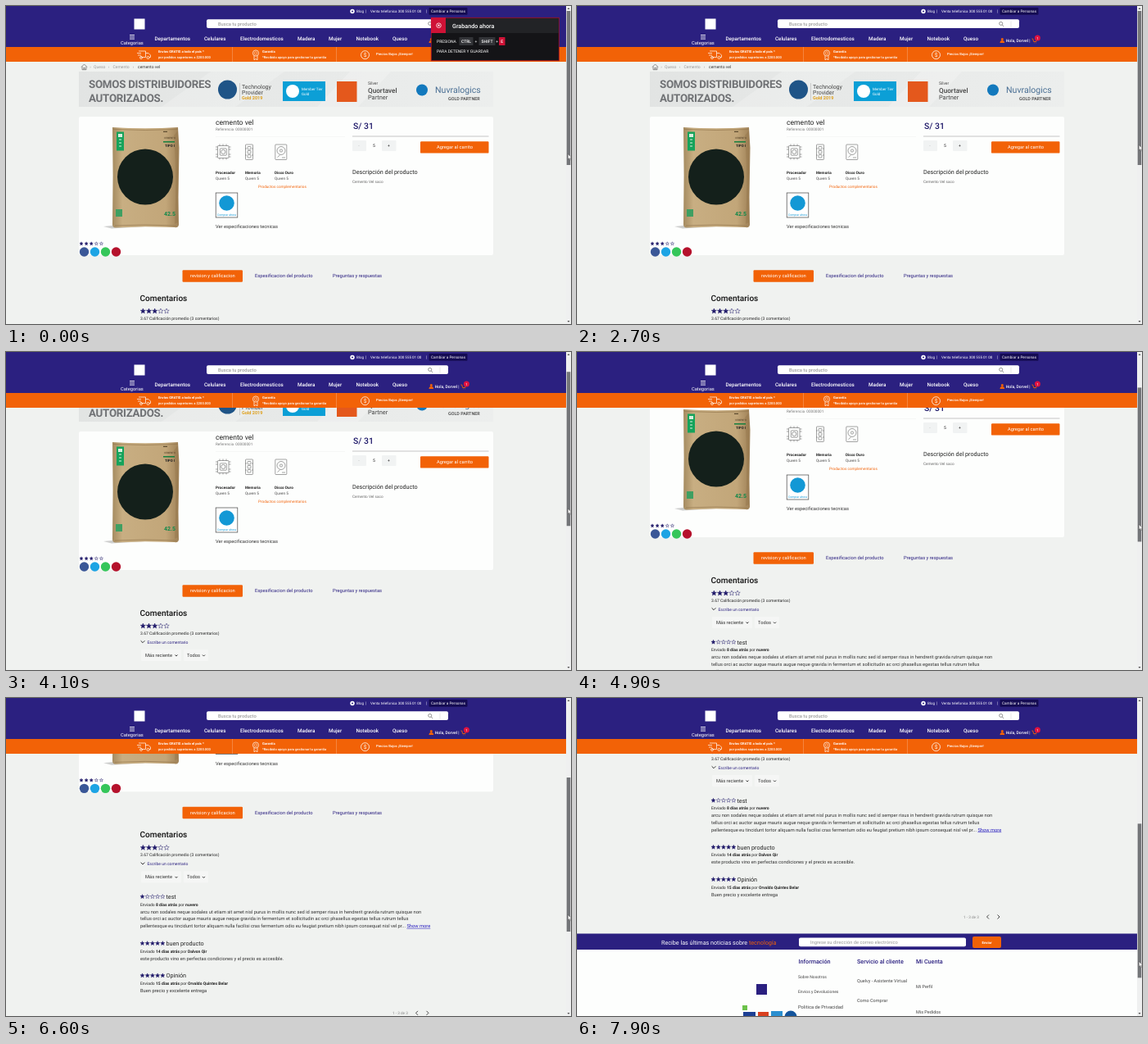
Recreate the animation shown at these times as an HTML page. Size 690 px wide and 388 px high, loop 8 s.

```html
<!DOCTYPE html>
<html lang="es">
<head>
<meta charset="utf-8">
<title>Tienda</title>
<style>
html, body { margin: 0; width: 100%; height: 100%; overflow: hidden; background: #f0f2f0; }
svg { display: block; width: 100vw; height: 100vh; }
text { font-family: Roboto, sans-serif; text-rendering: geometricPrecision; white-space: pre; }
</style>
</head>
<body>
<svg id="stage" viewBox="0 0 690 388"></svg>
<script>
const NAVY = '#2b2080', DEEP = '#1d1768', ORANGE = '#f26207', INK = '#222', GREY = '#777', WHITE = '#fff';
const XS = 4.3, S = 5.03, M = 5.75, L = 7.19, XL = 8.6, XXL = 10.06;

const rect = (x, y, w, h, fill, rx = 0, extra = '') =>
  `<rect x="${x}" y="${y}" width="${w}" height="${h}" rx="${rx}" fill="${fill}" ${extra}/>`;
const circle = (x, y, r, fill, extra = '') =>
  `<circle cx="${x}" cy="${y}" r="${r}" fill="${fill}" ${extra}/>`;
const ring = (x, y, r, color, w = 0.7) => circle(x, y, r, 'none', `stroke="${color}" stroke-width="${w}"`);
const frame = (x, y, w, h, color) => rect(x, y, w, h, 'none', 0.8, `stroke="${color}" stroke-width=".6"`);
const line = (d, color, w = 0.7) =>
  `<path d="${d}" fill="none" stroke="${color}" stroke-width="${w}" stroke-linejoin="round"/>`;
// y is the middle of the capitals
const text = (x, y, str, size = M, fill = INK, weight = 400, extra = '') =>
  `<text x="${x}" y="${(y + size * 0.35).toFixed(2)}" font-size="${size}" fill="${fill}" font-weight="${weight}" ${extra}>${str}</text>`;
const mid = (x, y, str, size, fill, weight) => text(x, y, str, size, fill, weight, 'text-anchor="middle"');
const chevron = (x, y, w, color = INK) => line(`M${x - w} ${y - w / 2}l${w} ${w} ${w} ${-w}`, color, 0.9);

function star(x, y, r, full) {
  const pts = Array.from({ length: 10 }, (_, i) => {
    const a = i * Math.PI / 5 - Math.PI / 2, k = i % 2 ? r * 0.42 : r;
    return (x + k * Math.cos(a)).toFixed(2) + ',' + (y + k * Math.sin(a)).toFixed(2);
  });
  return `<polygon points="${pts.join(' ')}" fill="${full ? DEEP : 'none'}" stroke="${DEEP}" stroke-width=".45"/>`;
}
const stars = (x, y, step, r, n) =>
  [0, 1, 2, 3, 4].map(i => star(x + i * step, y, r, i < n)).join('');

function banner() {
  const slogan = (y, s) => text(101, y, s, 13.3, '#6f7174', 700, 'letter-spacing="-.25"');
  return rect(89, 80, 506, 43, 'url(#steel)') +
    `<path d="M250 80h90l-60 43h-90zM420 80h50l-40 43h-50z" fill="#fff" opacity=".2"/>` +
    slogan(95.8, 'SOMOS DISTRIBUIDORES') + slogan(112, 'AUTORIZADOS.') +
    circle(270.5, 102, 11.5, '#1f5487') + line('M285.5 94v21', '#999', 0.4) +
    text(288, 98.5, 'Technology', 7, '#444') + text(288, 105.5, 'Provider', 7, '#444') +
    text(288, 112, 'Gold 2019', 5.5, '#dfa01c', 700) +
    rect(338, 92, 52, 24, '#0c9fd6') + circle(350, 104, 8, WHITE) +
    text(361, 101.5, 'Member Tier', 4.5, WHITE) + text(361, 107, 'Gold', 4.5, WHITE) +
    rect(404, 92, 24.5, 25, '#e4581c') +
    text(442, 94.5, 'Silver', S, '#444') + text(442, 103, 'Quortavel', 8.2, '#444', 500) +
    text(442, 111.8, 'Partner', 7.4, '#444') +
    circle(508, 102.5, 7, '#1379bd') + text(524, 102.5, 'Nuvralogics', 10.6, '#4a6f94') +
    text(540, 112.8, 'GOLD PARTNER', S + 0.4, '#444', 500);
}

function bag() {
  return `<path d="M119 269q30-4 50 0l-40 2.5z" fill="#777" opacity=".35"/>` +
    `<path d="M130 148q40 2.5 80 0l1.5 25-1 60 .5 34q-1 4-5 3l-36-.8-36 1.3q-4 0-4-4l.6-60z" fill="url(#kraft)"/>` +
    line('M131 150.5q39 2 79 0M133 268q37-2 75 0', '#96794f', 0.7) +
    `<path d="M205 158q4 50 1 108l4-2V152z" fill="#927448" opacity=".4"/>` +
    rect(135, 153.5, 9, 23, '#16a35b') + rect(137, 156, 5, 4, '#d8eedd') + line('M138 163h3M138 167h3M138 171h3', '#d8eedd', 1) +
    rect(192, 165, 14, 1.5, '#16803f') + rect(192, 152.8, 5, 1.2, '#5c4a2f') +
    mid(200, 161, 'CEMENTO', 3, '#5c4a2f', 500) + mid(200, 170.2, 'TIPO I', 4.4, INK, 700) +
    circle(170, 208.5, 34, '#14201b') +
    rect(134, 248, 8, 9, '#3f9f62') + text(193, 253.5, '42.5', 7, '#138a4b', 700);
}

function specs() {
  const g = '#666';
  const pins = [172, 175, 181, 184].map(y => `M256 ${y}h2.500M272 ${y}h2.500`).join('') +
    [261, 265, 269].map(x => `M${x} 168.500v2M${x} 185.500v2`).join('');
  const chip = frame(258.5, 170.5, 13.5, 15, g) + frame(261.3, 173.8, 8, 8.4, g) +
    ring(265.3, 178, 2.6, g, 0.6) + line(pins, g, 0.6);
  const ram = frame(292.5, 169, 9, 18.5, g) +
    [171.5, 176.5, 181.5].map(y => frame(295, y, 4, 3.5, g)).join('') +
    line('M292 174h2M292 182h2M300 174h2M300 182h2', g, 0.5);
  const disk = frame(328.8, 169, 14, 18.5, g) + ring(336, 176.5, 5, g, 0.6) + ring(336, 176.5, 1.6, g, 0.6) +
    line('M331.500 184.500l3-2.500M337 185h4', g, 0.6);
  return chip + ram + disk + [[256, 'Procesador'], [292, 'Memoria'], [328, 'Disco Duro']].map(([x, s]) =>
    text(x, 203.5, s, 4.67, INK, 700) + text(x, 210.3, 'Quven 5', 4.67, '#444')).join('');
}

function product() {
  const social = [[95.5, '#3a5797'], [108.5, '#1da4e4'], [121.5, '#35c65a'], [134.5, '#b5122c']];
  return rect(89, 135, 506, 169, '#fdfefd', 2) + bag() +
    text(256, 142, 'cemento vel', XL) + text(256, 150.5, 'Referencia  00000001', 4.67, GREY) +
    line('M256 159.5h158', '#eee', 0.5) + specs() +
    text(308, 220, 'Productos complementarios', 4.67, ORANGE) +
    rect(256.2, 228, 26.6, 30, WHITE, 0, 'stroke="#444" stroke-width=".7"') +
    circle(269.5, 240.5, 9.3, '#1398d5') + mid(269.5, 254.3, 'Comprar ahora', 3.5, '#1398d5') +
    text(256, 269.4, 'Ver especificaciones tecnicas', M, '#333') +
    text(424, 146, 'S/ 31', 10.4, DEEP, 500) + line('M423 159h166.500', '#888', 0.5) +
    rect(423, 164, 17, 13, '#f1f3f3', 1) + rect(459, 164, 17.5, 13, '#f1f3f3', 1) +
    mid(431, 170, '-', S, '#aaa') + mid(449.5, 170.3, '5', S) + mid(467.5, 170.3, '+', S) +
    rect(506, 165.2, 83.5, 14.4, ORANGE, 1.2) + mid(548, 172.4, 'Agregar al carrito', M, WHITE) +
    text(423, 202.3, 'Descripción del producto', L) + text(423, 214.5, 'Cemento Vel saco', 4.67, '#666') +
    stars(92, 290, 6.1, 2.2, 3) + social.map(([x, c]) => circle(x, 300, 5.7, c)).join('');
}

function review(y, n, title, days, who, body) {
  return stars(166.5, y, 6.2, 2.7, n) + text(195.5, y, title, L) +
    text(164, y + 9.5, `Enviado <tspan font-weight="700">${days} días atrás</tspan> por <tspan font-weight="700">${who}</tspan>`, S) +
    body.map((s, i) => text(164, y + 18.3 + i * 8.6, s, M, '#333')).join('');
}

function comments() {
  return rect(215.5, 322.3, 73.5, 14.5, ORANGE, 1.2) + mid(252.3, 329.3, 'revision y calificacion', M, WHITE) +
    text(304, 329.3, 'Espesificacion del producto', M, NAVY) + text(399, 329.3, 'Preguntas y respuestas', M, NAVY) +
    text(163.5, 356, 'Comentarios', XXL, '#111', 500) + stars(167.3, 372.3, 7.2, 3.3, 3) +
    text(164, 381, '3.67 Calificación promedio (3 comentarios)', S) +
    chevron(167, 391.5, 2.4) + text(172.5, 392, 'Escribe un comentario', S, NAVY) +
    rect(165, 401, 49, 14, '#f5f6f5', 1) + rect(217, 401, 30, 14, '#f5f6f5', 1) +
    text(170, 408, 'Más reciente', M, '#333') + chevron(208, 408.3, 1.5) +
    text(221, 408, 'Todos', M, '#333') + chevron(241.5, 408.3, 1.5) +
    review(432, 1, 'test', 8, 'nuvero', [
      'arcu non sodales neque sodales ut etiam sit amet nisl purus in mollis nunc sed id semper risus in hendrerit gravida rutrum quisque non',
      'tellus orci ac auctor augue mauris augue neque gravida in fermentum et sollicitudin ac orci phasellus egestas tellus rutrum tellus',
      'pellentesque eu tincidunt tortor aliquam nulla facilisi cras fermentum odio eu feugiat pretium nibh ipsum consequat nisl vel pr... <tspan fill="#2a20c0" text-decoration="underline">Show more</tspan>']) +
    review(489, 5, 'buen producto', 14, 'Dalvon Qir', ['este producto vino en perfectas condiciones y el precio es accesible.']) +
    review(528.3, 5, 'Opinión', 15, 'Orvaldo Quintes Belar', ['Buen precio y excelente entrega']) +
    text(472, 574, '1 - 3 de 3', 4.67, '#888') + line('M503 571.500l-2.500 2.500 2.500 2.500M513.500 571.500l2.500 2.500-2.500 2.500', '#333', 0.9);
}

function footer() {
  const links = [[270, 647, 'Sobre Nosotros', S], [270, 665, 'Envios y Devoluciones', S], [270, 684, 'Politica de Privacidad', M],
    [342, 652.5, 'Quelvy - Asistente Virtual', 5.5], [342, 676, 'Como Comprar', 5.5],
    [414, 659.5, 'Mi Perfil', 5.5], [414, 690.5, 'Mis Pedidos', 5.5]];
  return rect(0, 594.5, 684, 19.5, NAVY) + rect(0, 614, 684, 90, '#fdfefd') +
    text(103, 605, `Recibe las últimas noticias sobre <tspan fill="${ORANGE}">tecnología</tspan>`, L, WHITE) +
    rect(271, 599.5, 204, 10.7, WHITE, 2) + text(285, 605, 'Ingrese su dirección de correo electrónico', M, '#999') +
    rect(483, 598, 35, 14, ORANGE, 2) + mid(500.5, 605, 'Enviar', XS, WHITE, 700) +
    text(270.5, 628.3, 'Información', L, NAVY, 500) + text(342, 628.3, 'Servicio al cliente', L, NAVY, 500) +
    text(414, 628.3, 'Mi Cuenta', L, NAVY, 500) +
    links.map(([x, y, s, z]) => text(x, y, s, z, '#444')).join('') +
    rect(219, 656, 13, 13, NAVY) + rect(202, 682, 6, 6, '#6cc24a') +
    rect(203, 690, 15, 11, '#1c3f94') + rect(221, 690, 13, 11, '#d9401f') +
    rect(237, 689, 14, 12, '#2a8fd0') + circle(261, 696, 7.5, '#13549c');
}

function page() {
  const c = '#999';
  return line('M92 74.500l3.500-3.500 3.500 3.500M93 73.700v4h5v-4M94.800 77.700v-2.300h1.500v2.300', '#777', 0.8) +
    [103, 125.5, 155.5].map(x => mid(x, 74, '›', S, c)).join('') +
    text(107, 74.5, 'Queso', S, c) + text(130.5, 74.5, 'Cemento', S, c) + text(161, 74.5, 'cemento vel', S, '#333') +
    banner() + product() + comments() + footer();
}

function header() {
  const nav = [[181.5, 'Departamentos'], [242, 'Celulares'], [286, 'Electrodomesticos'], [356, 'Madera'],
    [394, 'Mujer'], [427.5, 'Notebook'], [472, 'Queso']];
  return rect(0, 0, 684, 50, NAVY) + rect(0, 50, 684, 18, ORANGE) +
    circle(423, 6.5, 2.7, WHITE) + circle(423, 6.5, 1, NAVY) + text(428, 6.5, 'Blog', 4.5, WHITE) +
    text(439, 6.3, '|', S, WHITE) + text(445, 6.5, 'Venta telefonica 300 555 01 00', 4.5, WHITE) + text(513, 6.3, '|', S, WHITE) +
    rect(516.5, 2, 47, 8.7, '#140b52', 1) + mid(540, 6.5, 'Cambiar a Personas', 4.7, WHITE) +
    rect(156.5, 15.5, 13, 13, WHITE) +
    rect(245, 16.3, 295, 10.7, WHITE, 2) + text(259, 21.8, 'Busca tu producto', M, '#888') +
    ring(517.7, 21.4, 2, '#666') + line('M519.200 23l2 2', '#666') + line('M530 18.500v7', '#ccc', 0.5) +
    line('M151 35.500h6M151 37.800h6M151 40.100h6', WHITE, 0.9) + text(140, 45, 'Categorias', M, WHITE) +
    nav.map(([x, s]) => text(x, 39.6, s, 6.3, WHITE, 500)).join('') +
    circle(519.3, 40.4, 1.5, ORANGE) + `<path d="M516.500 45q0-3 2.800-3t2.800 3z" fill="${ORANGE}"/>` +
    text(523.8, 42.2, 'Hola, Dorvel |', S, WHITE, 500) +
    line('M555.500 40h1.200l1 3.500h3l.6-2.500M558 45h.5M560.300 45h.5', ORANGE, 0.9) +
    circle(562.4, 39, 3.5, '#e0123f') + mid(562.4, 39, '1', XS, WHITE) + deals();
}

function deals() {
  const w = WHITE;
  return line('M162 55h8.500v7.500h-6M170.500 57.500h3.500l2.500 2.500v2.500h-1.500M160 57.500h5M161 60h4', w) +
    ring(165, 63, 1.5, w) + ring(173.5, 63, 1.5, w) +
    text(186, 55.8, 'Envíos GRATIS a todo el país *', 4.1, w, 700) + text(186, 62.3, 'por pedidos superiores a $200.000', 4.1, w, 500) +
    line('M276.500 50v18M403.500 50v18', '#f9a878', 0.5) +
    ring(305, 57.5, 3.6, w) + ring(305, 57.5, 1.7, w, 0.5) + line('M303 60.800v5l2-1.300 2 1.300v-5', w) +
    text(313, 55.8, 'Garantía', 4.1, w, 700) + text(313, 62.3, '*Recibido apoyo para gestionar tu garantía', 4.1, w, 500) +
    ring(438.5, 59.7, 5, w, 0.8) + mid(438.5, 59.7, '$', 6.5, w) +
    text(452, 59, 'Precios Bajos ¡Siempre!', 4.2, w, 500);
}

function toast() {
  const key = (x, w, s, bg) => rect(x, 38, w, 10, bg, 0.6) + mid(x + w / 2, 43.2, s, S, WHITE, 500);
  return rect(519.3, 14.3, 156, 52.4, '#141417', 0, 'stroke="#a8122c" stroke-width=".8"') +
    rect(537, 15, 138, 18, '#222326') + rect(519, 14, 18, 19, '#cf1236') +
    ring(528.5, 23.7, 2.8, WHITE, 0.8) + circle(528.5, 23.7, 1.1, WHITE) +
    text(545, 24, 'Grabando ahora', L, WHITE, 500) +
    text(526, 43.2, 'PRESIONA', S, WHITE) + key(553.5, 17, 'CTRL', '#333438') + mid(574, 43, '+', S, WHITE) +
    key(577.5, 20, 'SHIFT', '#333438') + mid(599.6, 43, '+', S, WHITE) + key(602, 7.5, 'E', '#cf1236') +
    text(526, 55.5, 'PARA DETENER Y GUARDAR', S, WHITE);
}

const stage = document.getElementById('stage');
stage.innerHTML = `<defs>
<linearGradient id="steel"><stop stop-color="#e2e4e3"/><stop offset="1" stop-color="#eceeed"/></linearGradient>
<linearGradient id="kraft"><stop stop-color="#a58b60"/><stop offset=".15" stop-color="#c8ae82"/><stop offset=".8" stop-color="#c2a679"/><stop offset="1" stop-color="#9f8157"/></linearGradient>
</defs>` + rect(0, 0, 690, 388, '#f0f2f0') + `<g id="page">${page()}</g>` + header() +
  rect(684, 0, 6, 388, '#eff0f0') + `<path d="M685.500 4l1.500-2 1.500 2zM685.500 384l1.500 2 1.500-2z" fill="#555"/>` +
  rect(684.7, 6, 4.6, 188, '#737578', 0, 'id="thumb"') + `<g id="toast">${toast()}</g>` +
  `<path id="cursor" d="M0-3.500v6.500l1.500-1.300 1 2.300 1-.5-1-2.200h2z" fill="#fff" stroke="#333" stroke-width=".4"/>`;

const [pageEl, thumb, toastEl, cursor] = ['page', 'thumb', 'toast', 'cursor'].map(id => document.getElementById(id));
const clamp = v => Math.min(1, Math.max(0, v));

// [seconds, scroll, speed] knots of the accelerating drag
const drag = [[2.9, 0, 21], [4.1, 38, 43], [4.9, 78, 56], [6, 147, 69], [7.2, 238, 88], [7.9, 307, 105]];
function scrollAt(t) {
  if (t <= drag[0][0]) return 0;
  let i = 0;
  while (i < drag.length - 2 && t > drag[i + 1][0]) i++;
  const [t0, a, va] = drag[i], [t1, b, vb] = drag[i + 1];
  const d = t1 - t0, u = clamp((t - t0) / d), v = 1 - u;
  return v * v * (1 + 2 * u) * a + u * u * (3 - 2 * u) * b + d * u * v * (v * va - u * vb);
}

function draw(ms) {
  const t = Math.floor(ms % 8000 / 100) / 10;
  const y = scrollAt(t);
  pageEl.setAttribute('transform', `translate(0 ${-y.toFixed(2)})`);
  thumb.setAttribute('y', 6 + y * 0.48);
  toastEl.setAttribute('opacity', clamp((1.6 - t) / 0.5));
  const hand = t < 2.9 ? 184 - 11 * clamp(t) : 176 + y * 0.485;
  cursor.setAttribute('transform', `translate(686.3 ${hand.toFixed(2)})`);
}

let start;
function tick(now) {
  start ??= now;
  draw(now - start);
  requestAnimationFrame(tick);
}
draw(0);
requestAnimationFrame(tick);
</script>
</body>
</html>
```
